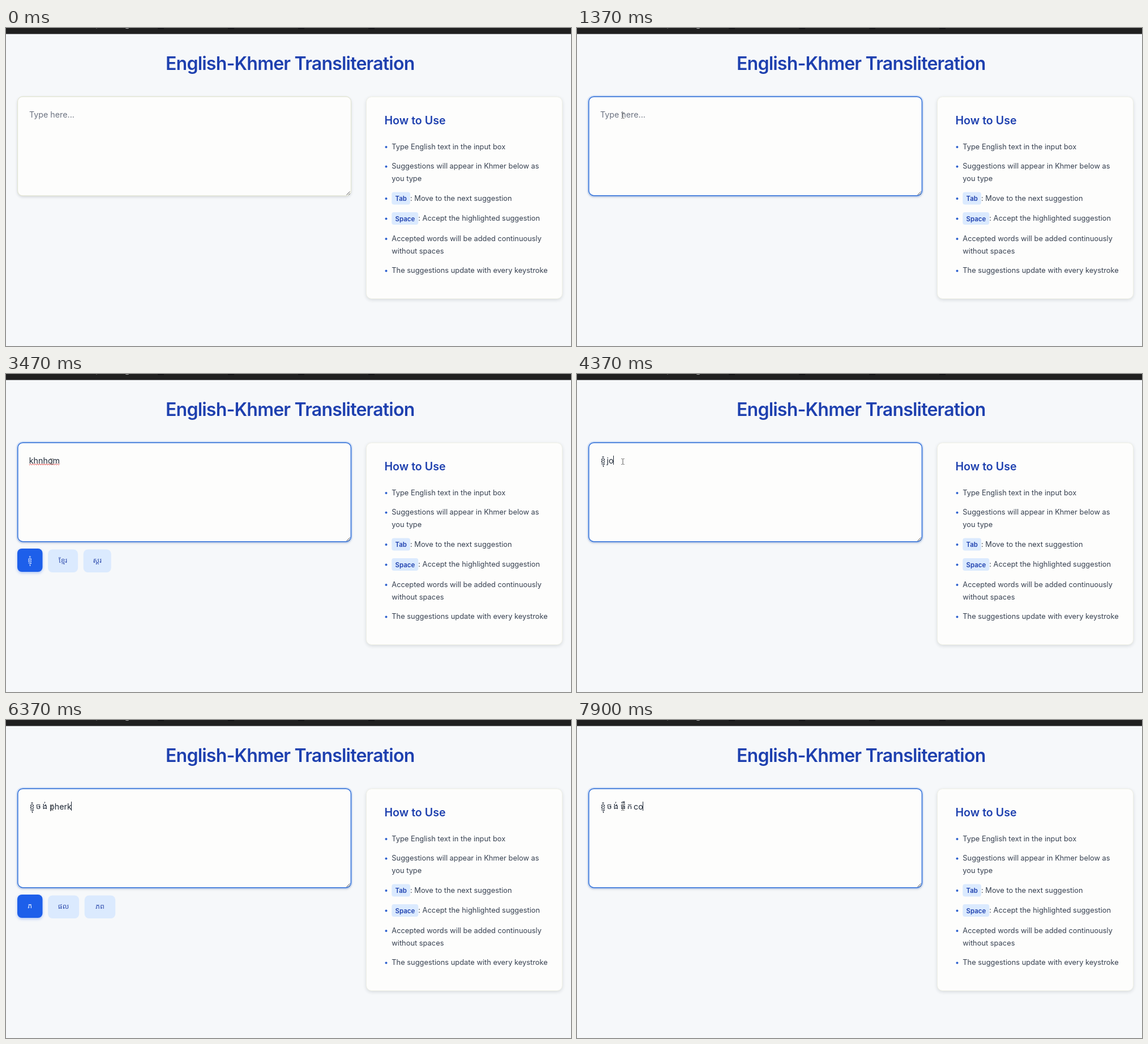
Animation of 998x561 px, one loop 8 s. Source, as an HTML page with a canvas:

```html
<!DOCTYPE html>
<html lang="en">
<head>
<meta charset="utf-8">
<title>English-Khmer Transliteration</title>
<style>
html, body { margin: 0; width: 100%; height: 100%; overflow: hidden; background: #f6f8fa; }
canvas { display: block; }
</style>
</head>
<body>
<canvas id="stage" width="998" height="561"></canvas>
<script>
const ctx = document.getElementById('stage').getContext('2d');
const LOOP = 8000, FOCUS = 770, BLINK = 530;
const SANS = 'Inter, "Noto Sans Khmer", "Noto Sans", sans-serif';
const KHMER = '"Noto Sans Khmer", "Noto Sans", sans-serif';

const SETS = {
  none: [],
  kh: [['ខ', 44.5], ['ឃ', 45], ['ខិម', 55.5], ['ខរ', 48.5], ['មើ', 49]],
  khnhom: [['ខ្ញុំ', 44.5], ['ខ្មែរ', 53], ['ស្គរ', 49]],
  jong: [['ចង់', 52]],
  ph: [['ភ', 44.5], ['ផល', 55], ['ភព', 54.5]],
  pherk: [['ផឹក', 54]]
};

// Accepted words with their left edges, and where the pending letters start
const WORDS = [['ខ្ញុំ', 41.5], ['ចង់', 53], ['ផឹក', 77]];
const LATIN_X = [40.8, 52.5, 77, 100];

// time, accepted words, pending letters
const KEYS = [
  [FOCUS, 0, ''], [1800, 0, 'k'], [1930, 0, 'kh'], [2030, 0, 'khn'],
  [2330, 0, 'khnh'], [2600, 0, 'khnho'], [2870, 0, 'khnhom'],
  [4130, 1, ''], [4230, 1, 'j'], [4330, 1, 'jo'], [4600, 1, 'jon'], [4800, 1, 'jong'],
  [5070, 2, ''], [5600, 2, 'p'], [5770, 2, 'ph'], [6000, 2, 'phe'], [6170, 2, 'pher'],
  [6340, 2, 'pherk'], [6730, 3, ''], [7270, 3, 'c'], [7870, 3, 'co']
];
const CHIPS = [
  [0, 'none'], [1850, 'kh'], [2930, 'khnhom'], [4130, 'none'], [4870, 'jong'],
  [5070, 'none'], [5660, 'ph'], [6430, 'pherk'], [6730, 'none']
];

// Pen strokes for Khmer letters, used when no Khmer font is present
const PEN = {
  'ខ': [8, 'M1-6Q2-8 3-6L2-4Q0-1 3 0H7V-7L4-6L7-4'],
  'ឃ': [10, 'M1-7Q3-7 2-4Q1 0 4 0H9V-7M5.5 0V-6'],
  'ម': [10, 'M1-7Q3-7 2-3V0L5-2L8 0V-7'],
  'រ': [6, 'M1-6L3-7L5-6V0L3 1'],
  'ស': [11, 'M1-6Q3-8 4-6Q1-4 2 0L5-3V0H9V-7L7-8'],
  'ភ': [10, 'M2 0V-5L4-7L5-5L7-7Q9-7 9-5V0'],
  'ផ': [10, 'M2-7Q0-4 2 0H9V-7M5 0V-6L3-5'],
  'ល': [11, 'M1-7Q3-7 2-3Q2 0 5-1V-7Q8-8 8-5V0H10V-7'],
  'ព': [9, 'M1-7Q3-7 2-4V0H8V-7M5 0V-4'],
  'ច': [10, 'M1-6Q4-9 8-6Q8 0 5 0Q1 0 2-4H5'],
  'ង': [9, 'M1-6Q3-8 4-6L2-3Q2 0 5 0Q7-1 6-7'],
  'ក': [10, 'M2 0V-5L1-6L4-8L8-6V0'],
  'ិ': [0, 'M-7-9Q-4-12-1-9Z'],
  'ឹ': [0, 'M-8-9Q-5-12-2-9ZM-4-11V-9'],
  'ុ': [0, 'M-3 1V4'],
  'ំ': [0, 'M-5-10a1 1 0 1 0 2 0a1 1 0 1 0-2 0'],
  '់': [0, 'M-4-11V-9'],
  'ែ': [5, 'M3-7Q1-7 1-4V0H3M3-4L1-3'],
  'ើ': [5, 'M3-7Q1-7 1-3V0H3M6-9Q9-12 13-9ZM13-9V-11'],
  '្ញ': [0, 'M-7 2V4H-4V2M-4 4H-1V2'],
  '្ម': [0, 'M-6 2V4L-4 3L-2 4V2'],
  '្គ': [0, 'M-8 4V2H-4V4']
};

const width = (s, font) => { ctx.font = font; return ctx.measureText(s).width; };
const hasKhmer = (() => {
  const f = '40px ' + KHMER;
  return Math.abs(width('ខ', f) - width('ឈ', f)) > 1;
})();

const strokes = w => w.replace(/(.(?:្.)?)([ែើ])/, '$2$1').match(/្.|./g).map(c => PEN[c]);

function khmer(word, x, y, size, color, { centered = false, spacing = 0 } = {}) {
  if (hasKhmer) {
    ctx.textAlign = centered ? 'center' : 'left';
    text(word, x, y, size + 'px ' + KHMER, color, spacing + 'px');
    ctx.textAlign = 'left';
    return;
  }
  const parts = strokes(word), k = size / 13;
  const total = parts.reduce((sum, p) => sum + p[0], 0);
  ctx.save();
  ctx.translate(centered ? x - total * k / 2 : x, y);
  ctx.scale(k, k);
  ctx.strokeStyle = color;
  ctx.lineWidth = 1.1;
  for (const [adv, d] of parts) {
    ctx.stroke(new Path2D(d));
    ctx.translate(adv && adv + spacing / 2, 0);
  }
  ctx.restore();
}

function text(s, x, y, font, color, spacing = '0px') {
  ctx.font = font;
  ctx.letterSpacing = spacing;
  ctx.fillStyle = color;
  ctx.fillText(s, x, y);
  ctx.letterSpacing = '0px';
}

function box(x, y, w, h, r, fill, stroke, line = 1) {
  ctx.beginPath();
  ctx.roundRect(x, y, w, h, r);
  if (fill) { ctx.fillStyle = fill; ctx.fill(); }
  if (stroke) { ctx.strokeStyle = stroke; ctx.lineWidth = line; ctx.stroke(); }
}

function shadowed(color, blur, dy, draw) {
  ctx.save();
  ctx.shadowColor = color;
  ctx.shadowBlur = blur;
  ctx.shadowOffsetY = dy;
  draw();
  ctx.restore();
}

function path(d, color, line = 1) {
  ctx.strokeStyle = color;
  ctx.lineWidth = line;
  ctx.stroke(new Path2D(d));
}

function topBar() {
  ctx.fillStyle = '#202020';
  ctx.fillRect(0, 0, 998, 10.6);
  ctx.fillStyle = '#0c0c10';
  for (let i = 0; i < 4; i++) ctx.fillRect(268 + i * 124, 0, 11, 1.5);
  path('M211 0Q214 1.5 217 0', '#bbb');
  path('M160 0V1', '#888');
}

function guide() {
  shadowed('rgba(30,41,59,.16)', 6, 2, () => box(636.5, 121.5, 346, 356, 9, '#fdfdfc'));
  box(636.5, 121.5, 346, 356, 9, null, '#eff0e6');
  text('How to Use', 668.5, 169.5, '600 19.6px ' + SANS, '#1e40af');
  const body = '12.85px ' + SANS, ink = '#374151', x = 681.3;
  const line = (s, y, left = x) => text(s, left, y, body, ink);
  line('Type English text in the input box', 213.6);
  line('Suggestions will appear in Khmer below as', 248.2);
  line('you type', 270);
  line(': Move to the next suggestion', 304.6, 714);
  line(': Accept the highlighted suggestion', 340.1, 728.3);
  line('Accepted words will be added continuously', 375.6);
  line('without spaces', 397.5);
  line('The suggestions update with every keystroke', 432.2);
  [['Tab', 289.5, 32.7], ['Space', 325, 47]].forEach(([s, y, w]) => {
    box(x, y, w, 22, 4, '#dbeafe');
    text(s, x + 6.3, y + 15.5, '600 11.4px ' + SANS, '#1e40af');
  });
  ctx.fillStyle = '#2f62cf';
  for (const y of [210, 244.5, 301, 336.5, 372, 428.5]) {
    ctx.beginPath();
    ctx.arc(671.5, y, 2, 0, 7);
    ctx.fill();
  }
}

function field(focus) {
  shadowed('rgba(30,41,59,.18)', 5, 2, () => box(20.5, 121, 589, 175, 9, '#fdfdfc'));
  box(20.5, 121, 589, 175, 9, null, '#e4e6d6', 1.3);
  if (focus) {
    ctx.globalAlpha = focus;
    box(19.5, 120, 591, 177, 10, null, 'rgba(59,130,246,.18)', 3);
    box(20.8, 121.2, 588.6, 174.5, 9, '#fdfdfc', '#2f6fdc', 1.5);
    ctx.globalAlpha = 1;
  }
  path('M601.5 294.5L607.5 288.5M605 294.5L607.5 292', '#555');
}

function chips(list) {
  let x = 20;
  list.forEach(([word, w], i) => {
    if (i) box(x, 309.5, w, 40.5, 8, '#dbeafe');
    else shadowed('rgba(37,99,235,.35)', 5, 2, () => box(x, 308, w, 41, 8, '#1d5fea'));
    khmer(word, x + w / 2, i ? 333 : 332, 12.5, i ? '#3552b0' : '#eef4ff', { centered: true });
    x += w + 9.6;
  });
}

function squiggle(x, w, y) {
  ctx.beginPath();
  for (let i = 0; i <= w; i++) ctx.lineTo(x + i, y + Math.sin(i * 1.6));
  ctx.strokeStyle = '#e0403c';
  ctx.lineWidth = 1;
  ctx.stroke();
}

function typed(t) {
  const font = '14.25px ' + SANS, y = 157.5;
  const [since, count, latin] = at(KEYS, t) || [0, 0, ''];
  if (!count && !latin) text('Type here...', 41, y, font, '#6b7280');
  WORDS.slice(0, count).forEach(([w, x]) => khmer(w, x, y - 1, 14.25, '#2b3442', { spacing: 2.5 }));
  const x = LATIN_X[count];
  text(latin, x, y, font, '#1f2937');
  const w = latin ? width(latin, font) : 0;
  if (latin === 'khnhom' && t >= 3250) squiggle(x, w, 159.5);
  if (t >= FOCUS && (t - since) % (2 * BLINK) < BLINK) {
    ctx.fillStyle = '#1f2937';
    ctx.fillRect(Math.round(x + w - .5), 144, 1, 16);
  }
}

function pointer(t) {
  if (t < 600) return;
  const p = 1 - Math.pow(1 - Math.min(1, (t - 600) / 170), 3);
  ctx.save();
  ctx.translate(190 - 109 * p, 270 - 115.5 * p);
  path('M-2.5-5H-1L0-4L1-5H2.5M0-4V4M-2.5 5H-1L0 4L1 5H2.5', '#555');
  ctx.restore();
}

const at = (rows, t) => rows.filter(r => r[0] <= t).pop();

function draw(t) {
  ctx.fillStyle = '#f6f8fa';
  ctx.fillRect(0, 0, 998, 561);
  topBar();
  text('English-Khmer Transliteration', 282, 74, '600 32px ' + SANS, '#1e40af', '-0.77px');
  guide();
  field(Math.max(0, Math.min(1, (t - FOCUS) / 200)));
  typed(t);
  chips(SETS[at(CHIPS, t)[1]]);
  pointer(t);
}

const start = performance.now();
function tick() {
  draw((performance.now() - start) % LOOP);
  requestAnimationFrame(tick);
}
tick();
</script>
</body>
</html>
```
